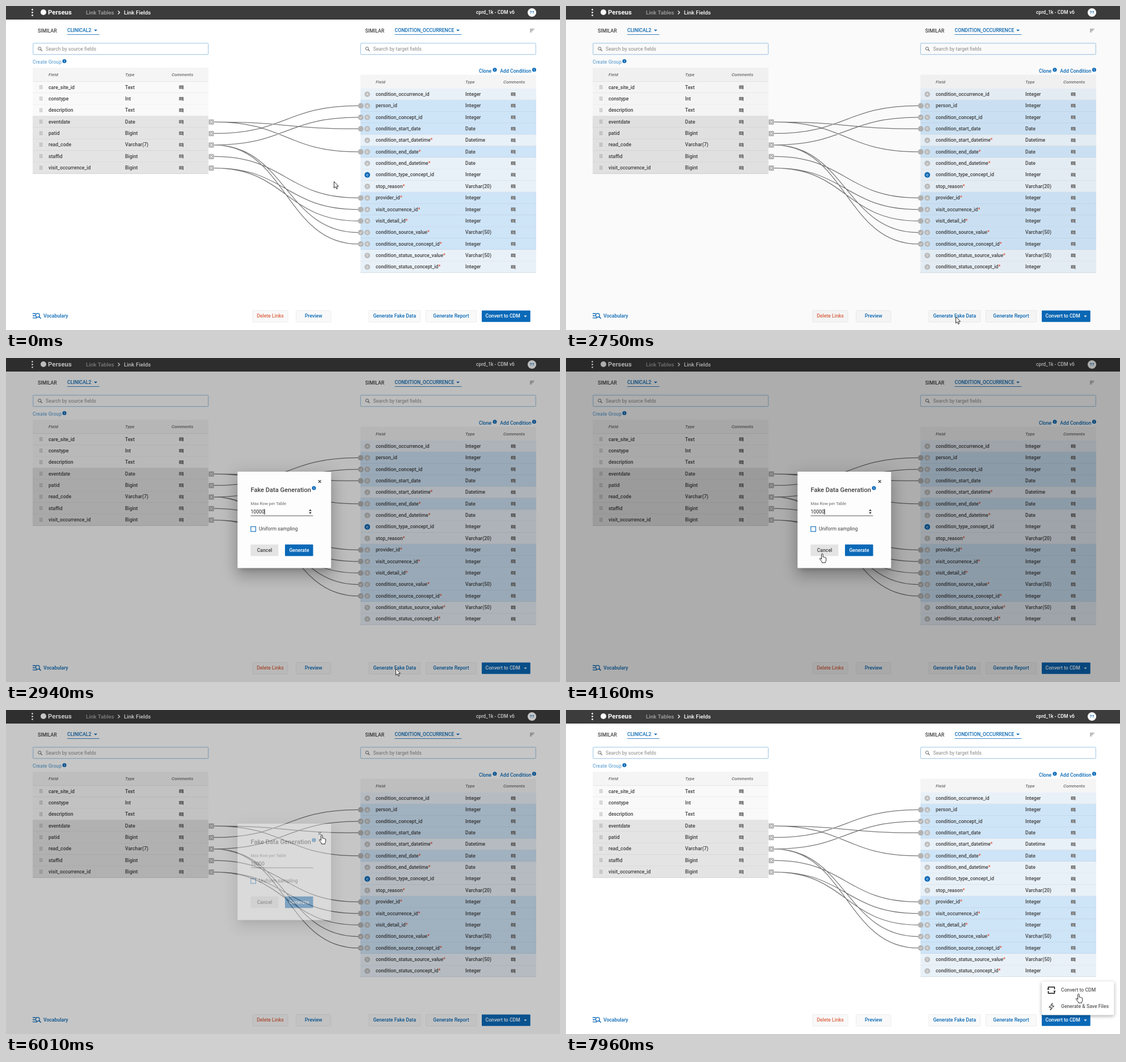
An HTML page for the animation above (8000 ms loop, 977 by 573 pixels).

```html
<!DOCTYPE html>
<html lang="en">
<head>
<meta charset="utf-8">
<title>Link Fields</title>
<style>
html, body { margin: 0; width: 100%; height: 100%; overflow: hidden; background: #fff; }
svg { display: block; width: 977px; height: 573px; }
text { font: 500 8.66px Roboto, sans-serif; fill: #404040; white-space: pre; }
.blue { fill: #0a69b5; }
.white { fill: #fff; }
.dim { fill: #a3a3a3; }
.regular { font-weight: 400; }
.head { font: italic 500 8.04px Roboto, sans-serif; fill: #6b6b6b; }
.bar { font-size: 9.9px; }
.star { fill: #e04a32; }
.links { fill: none; stroke: #777; stroke-width: 1.25; }

#shade, #dialog, #caret, #spin, #menu, #cursor, #arrow, #hand { animation: 8s linear infinite; }
#dialog, #menu { transform-box: fill-box; }
#shade { animation-name: shade; }
#dialog { animation-name: dialog; transform-origin: center; }
#menu { animation-name: menu; transform-origin: 50% 100%; }
#caret { animation-name: caret; animation-timing-function: step-end; }
#spin { animation-name: spin; animation-timing-function: step-end; }
#cursor { animation-name: move; }
#arrow { animation-name: arrow; animation-timing-function: step-end; }
#hand { animation-name: hand; animation-timing-function: step-end; }

@keyframes shade {
  0%, 33.75% { opacity: 0; }
  34.37%, 35.2% { opacity: .06; animation-timing-function: ease-out; }
  36.7% { opacity: .8; }
  39%, 74.3% { opacity: 1; }
  75.1%, 75.85% { opacity: .69; }
  76.6%, 77.3% { opacity: .16; }
  79.5%, 100% { opacity: 0; }
}
@keyframes dialog {
  0%, 35.2% { opacity: 0; transform: scale(.7); animation-timing-function: ease-out; }
  36.6%, 74.3% { opacity: 1; transform: none; }
  75.1%, 75.85% { opacity: .38; transform: none; }
  75.9%, 100% { opacity: 0; transform: none; }
}
@keyframes menu {
  0%, 95% { opacity: 0; transform: scale(.9); }
  96.5%, 100% { opacity: 1; transform: none; }
}
@keyframes caret {
  0%, 42.6%, 55.87%, 69.1%, 100% { opacity: 0; }
  36%, 49.25%, 62.5% { opacity: 1; }
}
@keyframes spin { 0% { opacity: 1; } 74.3%, 100% { opacity: 0; } }
@keyframes arrow {
  0%, 33.75%, 63.2%, 75.9% { opacity: 1; }
  18.7%, 51%, 64.8%, 93.6%, 100% { opacity: 0; }
}
@keyframes hand {
  0%, 33.75%, 63.2%, 75.9% { opacity: 0; }
  18.7%, 51%, 64.8%, 93.6%, 100% { opacity: 1; }
}
@keyframes move {
  0%, 6.6% { transform: translate(578px, 310px); }
  8.1% { transform: translate(571px, 328px); }
  12.5% { transform: translate(625px, 440px); }
  16.6%, 17.4% { transform: translate(686px, 531px); }
  18.8% { transform: translate(650px, 543px); }
  20.6% { transform: translate(668px, 555px); }
  22.5% { transform: translate(730px, 554px); }
  24% { transform: translate(738px, 543px); }
  25% { transform: translate(705px, 539px); }
  26.75%, 37.5% { transform: translate(687px, 549px); }
  40.6% { transform: translate(600px, 330px); }
  43.7% { transform: translate(522px, 238px); }
  46% { transform: translate(440px, 231px); }
  47.5% { transform: translate(420px, 275px); }
  49% { transform: translate(424px, 318px); }
  50.5% { transform: translate(440px, 357px); }
  51.6%, 52.75% { transform: translate(452px, 346px); }
  54.25% { transform: translate(520px, 346px); }
  57.25%, 59.4% { transform: translate(528px, 346px); }
  59.5%, 62.6% { transform: translate(529px, 346px); }
  64.1% { transform: translate(550px, 270px); }
  65.1%, 67.5% { transform: translate(556px, 210px); }
  69.75%, 75.87% { transform: translate(557px, 221px); }
  76.6%, 77.3% { transform: translate(625px, 315px); }
  80% { transform: translate(735px, 425px); }
  83.6% { transform: translate(825px, 522px); }
  85% { transform: translate(824px, 546px); }
  86.9% { transform: translate(860px, 558px); }
  89.4% { transform: translate(925px, 552px); }
  90.6% { transform: translate(937px, 525px); }
  91.9% { transform: translate(903px, 497px); }
  93.1% { transform: translate(898px, 530px); }
  94.25%, 95.75% { transform: translate(914px, 546px); }
  98.75%, 100% { transform: translate(904px, 502px); }
}
</style>
</head>
<body>
<svg id="stage" viewBox="0 0 977 573"></svg>
<script>
const ROW = 20.37;
const BLUE = '#0a69b8';

const text = (x, y, s, cls = '', extra = '') => `<text x="${x}" y="${y}" class="${cls}" ${extra}>${s}</text>`;
const mid = (x, y, s, cls = '', extra = '') => text(x, y, s, cls, `text-anchor="middle" ${extra}`);
const rect = (x, y, w, h, fill, extra = '') => `<rect x="${x}" y="${y}" width="${w}" height="${h}" fill="${fill}" ${extra}/>`;
const circle = (x, y, r, fill) => `<circle cx="${x}" cy="${y}" r="${r}" fill="${fill}"/>`;
const line = (d, stroke, w = 1, extra = '') => `<path d="${d}" fill="none" stroke="${stroke}" stroke-width="${w}" ${extra}/>`;
const shape = (d, fill) => `<path d="${d}" fill="${fill}"/>`;
const caretDown = (x, y, fill, r = 3) => shape(`M${x - r} ${y}h${2 * r}l${-r} ${r}z`, fill);

const info = (x, y) => circle(x, y, 3.5, BLUE) +
  line(`M${x} ${y - .4}v2.3M${x} ${y - 2}v1`, '#fff', .9);

const note = (x, y) => shape(`M${x - 3.8} ${y - 3.4}h7.6v7.2l-1.6-1.4h-6z`, '#666') +
  line(`M${x - 2.4} ${y - 1.8}h4.8m-4.8 1.5h4.8m-4.8 1.5h4.8`, '#ddd', .6);

const lens = (x, y, r, color, w) => `<circle cx="${x}" cy="${y}" r="${r}" fill="none" stroke="${color}" stroke-width="${w}"/>` +
  line(`M${x + r * .7} ${y + r * .7}l${r} ${r}`, color, w * 1.2);

function grip(x, y) {
  let out = '';
  for (let i = 0; i < 6; i++) out += circle(x + (i % 2 ? 1.5 : -1.5), y + (Math.floor(i / 2) - 1) * 2.5, .75, '#666');
  return out;
}

function topBar() {
  return rect(0, 0, 977, 24, '#3c3c3c') +
    [6.5, 11.5, 16.5].map(y => circle(46.5, y, 1.4, '#fff')).join('') +
    circle(66, 11, 5, '#fff') +
    text(74, 14.7, 'Perseus', 'white', 'style="font-size:11.4px;font-weight:700"') +
    text(141, 14.5, 'Link Tables', 'bar dim') +
    line('M197.5 8.5l3 3l-3 3', '#fff', 1.3) +
    text(208, 14.5, 'Link Fields', 'bar white') +
    text(829, 14.4, 'cprd_1k - CDM v6', 'white') +
    circle(927.5, 11.5, 7.6, '#fff') +
    mid(927.5, 14.4, '??', 'blue', 'style="font-size:8px"');
}

function panelTop(x, tab, tabEnd, hint) {
  return text(x + 9, 46.9, 'SIMILAR') +
    text(x + 61, 46.4, tab, 'blue') +
    caretDown(tabEnd - 6.5, 41.7, BLUE) +
    rect(x + 61, 50.2, tabEnd - x - 61, .8, BLUE) +
    rect(x + 1, 66, 308.5, 19.5, '#fff', 'rx="1.5" stroke="#dceaf5" stroke-width="2.6"') +
    rect(x + 1, 66, 308.5, 19.5, '#fff', 'rx="1.5" stroke="#a9cde8" stroke-width=".9"') +
    lens(x + 12.3, 75.2, 2.6, '#666', 1) +
    text(x + 23, 78.9, hint, 'regular', 'style="fill:#8b8b8b"');
}

function tableHead(x, y, nameX, typeX, noteX) {
  return rect(x, y, 310, 24.4, '#f5f5f5') +
    text(nameX, y + 15.1, 'Field', 'head') +
    text(typeX, y + 15.1, 'Type', 'head') +
    text(noteX, y + 15.1, 'Comments', 'head');
}

const sourceRows = [
  'care_site_id Text', 'constype Int', 'description Text', 'eventdate Date',
  'patid Bigint', 'read_code Varchar(7)', 'staffid Bigint', 'visit_occurrence_id Bigint'
];
// badge, link mark (- none, o linked, v checked), name, type
const targetRows = [
  'A - condition_occurrence_id Integer', 'A o person_id Integer', 'C v condition_concept_id Integer',
  'C o condition_start_date Date', 'C - condition_start_datetime* Datetime', 'C o condition_end_date* Date',
  'C - condition_end_datetime* Date', 'C - condition_type_concept_id Integer', 'C - stop_reason* Varchar(20)',
  'A o provider_id* Integer', 'A o visit_occurrence_id* Integer', 'A o visit_detail_id* Integer',
  'C v condition_source_value* Varchar(50)', 'C v condition_source_concept_id* Integer',
  'C - condition_status_source_value* Varchar(50)', 'C - condition_status_concept_id* Integer'
];
const pairs = [[3, 3], [3, 5], [4, 1], [5, 2], [5, 12], [5, 13], [6, 9], [7, 10], [7, 11]];
const sourceY = i => 143.8 + i * ROW;
const targetY = i => 156.1 + i * ROW;

function sourceTable() {
  return tableHead(47, 109.2, 75, 210, 292) + sourceRows.map((row, i) => {
    const [name, type] = row.split(' ');
    const y = sourceY(i), linked = i > 2;
    return rect(47, y - ROW / 2, 310, ROW, linked ? '#e4e4e4' : '#f9f9f9') +
      rect(47, y + ROW / 2 - .5, 310, .8, linked ? '#cdcdcd' : '#e2e2e2') +
      grip(61.7, y - .4) + text(75, y + 2.8, name) + text(210, y + 2.8, type) + note(309.2, y + .2);
  }).join('') + rect(47, 133.2, 310, .8, '#e2e2e2');
}

function targetTable() {
  return tableHead(625, 121.6, 652, 810, 877) + targetRows.map((row, i) => {
    const [badge, mark, name, type] = row.split(' ');
    const y = targetY(i);
    const label = name.replace('*', '<tspan class="star">*</tspan>');
    return rect(625, y - ROW / 2, 310, ROW, mark === '-' ? '#e9f1f8' : '#cee4f7') +
      rect(625, y + ROW / 2 - .5, 310, .8, mark === '-' ? '#d0d9e1' : '#b7cddf') +
      circle(637.2, y, 4.9, i === 7 ? BLUE : '#bcbcbc') +
      mid(637.2, y + 2.2, badge, 'white', 'style="font-size:6.2px"') +
      text(652, y + 2.8, label) + text(810, y + 2.8, type) + note(894.5, y + .2);
  }).join('');
}

function links() {
  const curves = pairs.map(([a, b]) => {
    const y1 = sourceY(a) + .2, y2 = targetY(b);
    return `M367 ${y1}C493.5 ${y1} 493.5 ${y2} 621 ${y2}`;
  }).join('');
  const starts = [3, 4, 5, 6, 7].map(i => {
    const y = sourceY(i) + .3;
    return rect(357.5, y - 4.6, 9.2, 9.2, '#b4b4b4', 'rx="1"') +
      line(`M359.7 ${y - 2.4}l4.8 4.8m0-4.8l-4.8 4.8`, '#fff', 1);
  }).join('');
  const ends = targetRows.map((row, i) => {
    const mark = row[2], y = targetY(i);
    if (mark === '-') return '';
    return circle(625.6, y, 4.9, '#b4b4b4') +
      (mark === 'v' ? line(`M623.4 ${y}l1.6 1.7l3-3.4`, '#fff', 1) : '');
  }).join('');
  return `<path class="links" d="${curves}"/>` + starts + ends;
}

const button = (x, w, label, cls, extra) => rect(x + .5, 538.5, w - 1, 20.5, '#f9f9f9', 'rx="1.5" stroke="#ededed"') +
  mid(x + w / 2, 551.4, label, cls, extra);

function footer() {
  return line('M47 544h5.5M47 547.8h4.5M47 551.6h8', BLUE, 1.4) + lens(55.8, 547, 3.4, BLUE, 1.3) +
    text(66, 551.4, 'Vocabulary', 'blue') +
    button(434.5, 63, 'Delete Links', '', 'style="fill:#dc6444"') +
    button(511, 62.5, 'Preview', 'blue') +
    button(639.5, 91.5, 'Generate Fake Data', 'blue') +
    button(740, 90, 'Generate Report', 'blue') +
    rect(839, 538.6, 85.7, 20.1, BLUE, 'rx="1"') +
    text(845.5, 551.4, 'Convert to CDM', 'white') +
    caretDown(916, 547.6, '#fff', 2.6);
}

const shadow = (dy, blur, spread, alpha) =>
  rect(408.3 - spread, 201 + dy - spread, 165 + 2 * spread, 170.5 + 2 * spread, '#000',
    `opacity="${alpha}" style="filter:blur(${blur}px)"`);

function dialog() {
  return `<g id="dialog">` +
    shadow(6.8, 4.6, -4.3, .2) + shadow(14.8, 11.7, 1.9, .14) + shadow(5.6, 14.2, 4.9, .12) +
    rect(408.3, 201, 165, 170.5, '#fdfdfd', 'rx="1"') +
    line('M550.8 216l4.8 4.8m0-4.8l-4.8 4.8', '#333', 1.1) +
    text(431.5, 237, 'Fake Data Generation', '', 'style="font-size:11.1px"') + info(543, 230) +
    text(431.5, 260.3, 'Max Row per Table', '', 'style="font-size:7.42px;fill:#858585"') +
    text(431.5, 274.6, '10000', 'regular', 'style="fill:#222"') +
    rect(455.6, 267, .9, 10, '#000', 'id="caret"') +
    `<g id="spin">${shape('M534 270.6l2.5-3l2.5 3zM534 272.8l2.5 3l2.5-3z', '#333')}</g>` +
    rect(431.5, 278.6, 110, .9, '#444') +
    rect(431.8, 298.2, 8.6, 8.6, '#fff', `stroke="${BLUE}" stroke-width="1.1"`) +
    text(446, 305.4, 'Uniform sampling', 'regular') +
    rect(431.3, 329.7, 49, 20.6, '#e4e4e4', 'rx="1"') + mid(456, 343, 'Cancel') +
    rect(492, 329.7, 49.6, 20.6, BLUE, 'rx="1"') + mid(517, 343, 'Generate', 'white') +
    '</g>';
}

function menu() {
  return `<g id="menu">` +
    rect(839, 480, 127.5, 59.5, '#fff', 'rx="2" style="filter:drop-shadow(0 2px 3px rgba(0,0,0,.32))"') +
    line('M850.5 494v-4h11v4M850.5 497v4h11v-4', '#111', 1.5, 'stroke-linejoin="round"') +
    shape('M848.3 494.5h4.4l-2.2-2.8zM859.3 496.4h4.4l-2.2 2.8z', '#111') +
    line('M857.8 518.5l-6 7h4l-1.4 5.2l6.2-7.2h-4z', '#222', 1, 'stroke-linejoin="round"') +
    text(873, 497.6, 'Convert to CDM', '', 'style="fill:#5c5c5c"') +
    text(873, 527, 'Generate &amp; Save Files', '', 'style="fill:#5c5c5c"') +
    '</g>';
}

function cursor() {
  const ink = 'fill="#fff" stroke="#111" stroke-width=".9" stroke-linejoin="round"';
  return `<g id="cursor">
    <path id="arrow" ${ink} d="M.5 .5V12L3.1 9.6L4.9 13.6L6.7 12.8L5 8.9H8.5Z"/>
    <path id="hand" ${ink} d="M-1.4 10V1.4a1.25 1.25 0 0 1 2.5 0V6q1.2-.8 2.1.3q1.2-.6 1.9.6q1.5-.3 1.6 1.2V11.5q0 1.6-1.2 3V16H-.6V14.5L-4.4 9.6q-.6-1.6.9-1.6q1.1.2 2.1 2z"/>
  </g>`;
}

document.getElementById('stage').innerHTML =
  topBar() +
  panelTop(47, 'CLINICAL2', 164.5, 'Search by source fields') +
  panelTop(624.5, 'CONDITION_OCCURRENCE', 803.5, 'Search by target fields') +
  line('M924 41h7.4M924 43.4h5.6M924 45.8h3', '#666', 1) +
  text(47, 102.4, 'Create Group', '', 'style="fill:#73add9"') + info(103, 97.5) +
  text(834, 118, 'Clone', 'blue') + info(862, 112.8) +
  text(871.3, 118, 'Add Condition', 'blue') + info(931.4, 112.8) +
  sourceTable() + targetTable() + links() + footer() +
  rect(0, 0, 977, 573, 'rgba(0,0,0,.32)', 'id="shade"') +
  dialog() + menu() + cursor();
</script>
</body>
</html>
```
